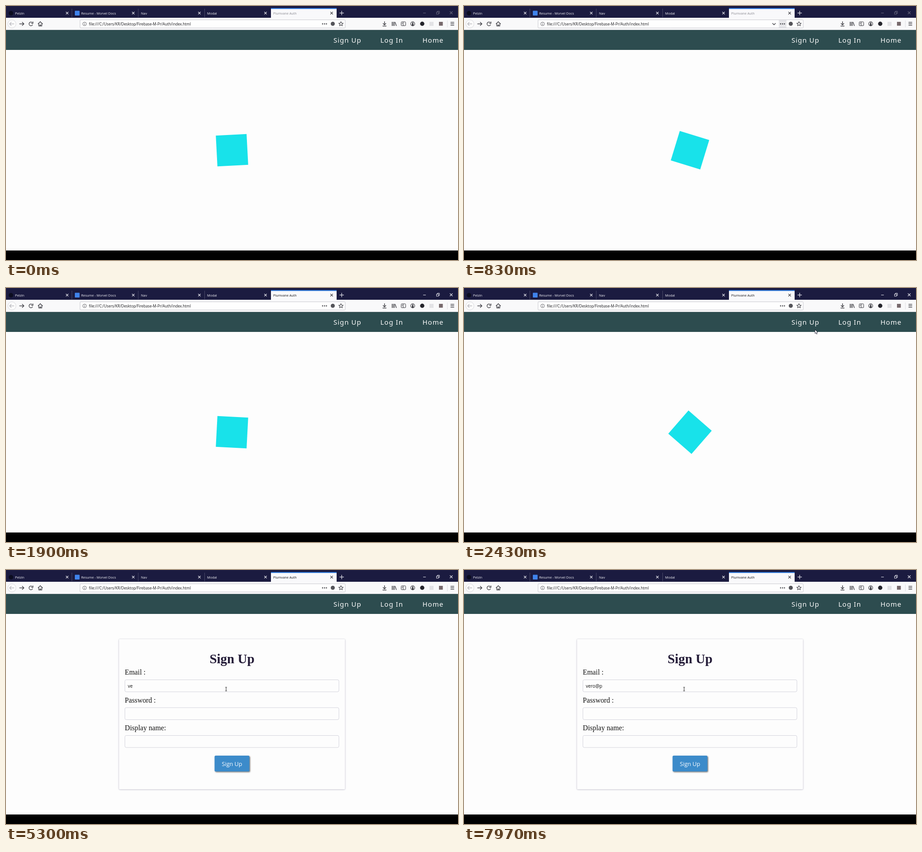
Write an HTML page with a canvas that moves like this. It is 998 px wide and 561 px high and loops after 8 s.

```html
<!DOCTYPE html>
<html lang="en">
<head>
<meta charset="utf-8">
<title>Auth demo</title>
<style>
  html, body { margin: 0; width: 100%; height: 100%; overflow: hidden; background: #fdfdfd; }
  canvas { display: block; width: 100%; height: 100%; }
</style>
</head>
<body>
<canvas id="stage" width="998" height="561"></canvas>
<script>
const ctx = document.getElementById('stage').getContext('2d');
const LOOP = 8000;
const STEP = 100 / 3;
const UI = '"Open Sans", "Noto Sans", sans-serif';
const SERIF = '"Liberation Serif", serif';
const PATH = 'file:///C:/Users/KR/Desktop/Firebase-M-Pr/Auth/index.html';
const INK = '#3a3a40';

const FOCUS_AT = 870;
const URL_HOVER = [740, 960];
const STATUS = [2530, 3230];
const MODAL_AT = 2830;
const EMAIL = 'vero@p';
const KEY_TIMES = [4870, 5200, 5700, 5930, 7370, 7830];

// Pointer path: time, x, y
const POINTER = [
  [2150, 792, 140], [2430, 775, 92], [2600, 765, 79],
  [2830, 765, 79], [3030, 661, 245], [3870, 486, 263]
];

const within = (t, [from, to]) => t >= from && t < to;

function rect(x, y, w, h, color) {
  ctx.fillStyle = color;
  ctx.fillRect(x, y, w, h);
}

function rounded(x, y, w, h, r, fill, stroke) {
  ctx.beginPath();
  ctx.roundRect(x, y, w, h, r);
  if (fill) { ctx.fillStyle = fill; ctx.fill(); }
  if (stroke) { ctx.strokeStyle = stroke; ctx.lineWidth = 1; ctx.stroke(); }
}

function disc(x, y, r, fill, stroke, width = 1) {
  ctx.beginPath();
  ctx.arc(x, y, r, 0, Math.PI * 2);
  if (fill) { ctx.fillStyle = fill; ctx.fill(); }
  if (stroke) { ctx.strokeStyle = stroke; ctx.lineWidth = width; ctx.stroke(); }
}

function line(points, color, width = 1.2) {
  ctx.beginPath();
  points.forEach(([x, y]) => ctx.lineTo(x, y));
  ctx.strokeStyle = color;
  ctx.lineWidth = width;
  ctx.stroke();
}

function text(str, x, y, font, color, align = 'left', spacing = 0) {
  ctx.font = font;
  ctx.fillStyle = color;
  ctx.textAlign = align;
  ctx.letterSpacing = spacing + 'px';
  ctx.fillText(str, x, y);
}

function cross(x, y, r, color) {
  line([[x - r, y - r], [x + r, y + r]], color, 1.1);
  line([[x - r, y + r], [x + r, y - r]], color, 1.1);
}

function drawTabs(active) {
  rect(0, 0, 998, 26, '#1b1b40');
  const tabs = [['Pelzin', 20], ['Resume - Morvel Docs', 166], ['Nav', 298], ['Modal', 444]];
  tabs.forEach(([label, x], i) => {
    text(label, x, 18.6, `7.4px ${UI}`, '#f2f2f6');
    cross(135 + i * 146, 15.7, 2.7, '#e8e8ee');
    if (i < 3) rect(145 + i * 146.5, 6, 1, 19, '#4b4b68');
  });
  disc(11, 16, 5, '#0c0d20');
  rounded(152, 10.5, 10.5, 10.5, 1, '#3f83ec');
  rect(585, 5, 145, 21, '#f9f9fb');
  rect(585, 4.5, 145, 2, '#2878e0');
  text('Plumvane Auth', 590, 18.6, `7.3px ${UI}`, active ? '#18181c' : '#8b8b92');
  cross(719, 15.7, 2.8, INK);
  line([[736.5, 15.5], [746, 15.5]], '#eeeef4', 1.2);
  line([[741.2, 10.8], [741.2, 20.2]], '#eeeef4', 1.2);

  const control = active ? '#e6e6ee' : '#65657d';
  line([[921, 15.5], [927, 15.5]], control, 1);
  ctx.strokeStyle = control;
  ctx.strokeRect(950.5, 13.5, 4.5, 4.5);
  line([[952.5, 13], [952.5, 11.5], [957, 11.5], [957, 16.5], [955, 16.5]], control, 1);
  cross(983, 15, 3, control);
}

function arrow(x, y, dir, color) {
  line([[x - 5 * dir, y], [x + 5 * dir, y]], color, 1.4);
  line([[x + dir, y - 4], [x + 5 * dir, y], [x + dir, y + 4]], color, 1.4);
}

function drawToolbar(hover) {
  rect(0, 26, 998, 27, '#f9f9fa');
  rect(0, 52, 998, 1, '#d8d8dc');
  disc(13, 39.5, 9, '#fcfcfc', '#d8d8dc');
  arrow(13, 39.5, -1, '#b9b9be');
  arrow(34.5, 39.5, 1, INK);

  // Reload and home
  ctx.beginPath();
  ctx.arc(55, 39.5, 4.1, 0.4, 5.4);
  ctx.strokeStyle = INK;
  ctx.lineWidth = 1.4;
  ctx.stroke();
  line([[59.5, 34.5], [59.5, 38.3], [55.8, 38.3]], INK, 1.4);
  line([[70.5, 39.8], [75.7, 34.8], [81, 39.8]], INK, 1.4);
  line([[72.5, 39], [72.5, 44], [79, 44], [79, 39]], INK, 1.4);
  rect(74.8, 41, 2, 3, INK);

  rounded(163.5, 30.5, 585.5, 18, 1.5, '#fefefe', '#c9c9d0');
  disc(173.5, 39.5, 4, null, '#606066');
  rect(173, 39, 1, 3, '#606066');
  rect(173, 37, 1, 1, '#606066');
  text(PATH, 183, 42.8, `8.25px ${UI}`, '#18181c');
  if (hover) {
    line([[681, 38], [684.5, 41.5], [688, 38]], INK, 1.3);
    rect(695, 31, 17, 17, '#e6e6e9');
  }
  [699, 703.3, 707.5].forEach(x => disc(x, 39.5, 1.3, INK));
  disc(721.5, 39.3, 4.5, '#55555a');

  ctx.beginPath();
  for (let i = 0; i < 10; i++) {
    const a = -Math.PI / 2 + i * Math.PI / 5, r = i % 2 ? 2.3 : 5;
    ctx.lineTo(739.6 + r * Math.cos(a), 39.6 + r * Math.sin(a));
  }
  ctx.closePath();
  ctx.strokeStyle = INK;
  ctx.lineWidth = 1.1;
  ctx.stroke();

  // Download, library, sidebar, account, add-ons, menu
  line([[835.7, 34], [835.7, 41.5]], INK, 1.4);
  line([[832.3, 38.3], [835.7, 41.7], [839.1, 38.3]], INK, 1.4);
  line([[831.5, 44.3], [840, 44.3]], INK, 1.4);
  [852.5, 855, 857.5].forEach(x => line([[x, 35], [x, 44]], INK, 1.3));
  line([[859, 35.5], [862, 44]], INK, 1.3);
  rounded(872.5, 35, 10, 8.5, 1.5, null, INK);
  line([[877, 35], [877, 43.5]], INK, 1);
  [37.5, 39.5].forEach(y => line([[874, y], [876, y]], INK, 0.8));
  disc(898, 39.3, 4.5, null, INK, 1.2);
  disc(898, 38, 1.7, INK);
  disc(898, 41.5, 2.2, INK);
  disc(919, 39.3, 4.7, '#25252c');
  rect(935, 35, 9, 9, '#e3e3e6');
  rect(956, 35, 8.5, 8.5, '#77696c');
  rect(974, 32, 1, 15, '#dedee2');
  [36, 39.3, 42.6].forEach(y => line([[981.5, y], [989.5, y]], INK, 1.3));
}

function drawNav() {
  rect(0, 53, 998, 44, '#2d4c4f');
  [['Sign Up', 723], ['Log In', 826.5], ['Home', 919.5]].forEach(([label, x]) =>
    text(label, x, 80.5, '500 15px "Noto Sans", "Open Sans", sans-serif', '#fafafa', 'left', 1));
}

function drawSpinner(t) {
  const time = Math.floor(t / STEP + 0.15) * STEP;
  ctx.save();
  ctx.translate(499, 318.5);
  ctx.rotate((-3 + time * 0.24) * Math.PI / 180);
  rect(-34, -34, 68, 68, '#18e2ea');
  ctx.restore();
}

function drawModal(t) {
  ctx.save();
  ctx.shadowColor = 'rgba(50, 45, 90, 0.4)';
  ctx.shadowBlur = 3;
  ctx.shadowOffsetY = 0.5;
  rounded(249.5, 152.5, 499, 332, 2, '#fdfdfd');
  ctx.restore();
  text('Sign Up', 499, 206, `bold 29px ${SERIF}`, '#241c38', 'center');

  [['Email :', 231], ['Password :', 292.5], ['Display name:', 354]].forEach(([label, y], i) => {
    text(label, 262.3, y, `15.7px ${SERIF}`, '#111');
    rounded(262.5, 242.5 + i * 61.5, 472.5, 26.5, 3, '#fdfdfd', '#d3d3dc');
  });
  const typed = KEY_TIMES.filter(k => t >= k).length;
  text(EMAIL.slice(0, typed), 269, 260.3, `10.2px ${UI}`, '#111');

  ctx.save();
  ctx.shadowColor = 'rgba(0, 0, 0, 0.55)';
  ctx.shadowBlur = 3;
  ctx.shadowOffsetX = ctx.shadowOffsetY = 1.5;
  rounded(460.5, 410, 77, 35, 2.5, '#3c8bca');
  ctx.restore();
  text('Sign Up', 499, 432.5, `12.6px ${UI}`, '#fafcff', 'center');
}

function drawStatus() {
  rect(0, 526, 215, 14, '#f2f2f4');
  line([[0, 526.5], [214.5, 526.5], [214.5, 540]], '#d0d0d4', 1);
  text(PATH + '#', 2.5, 536.5, `7.2px ${UI}`, '#3a3a3e');
}

function pointerAt(t) {
  const next = POINTER.findIndex(p => p[0] > t);
  if (next < 0) return POINTER[POINTER.length - 1].slice(1);
  const [t0, x0, y0] = POINTER[next - 1], [t1, x1, y1] = POINTER[next];
  const u = (t - t0) / (t1 - t0), e = u * u * (3 - 2 * u);
  return [x0 + (x1 - x0) * e, y0 + (y1 - y0) * e];
}

function drawPointer(t) {
  if (t < POINTER[0][0]) return;
  const [x, y] = pointerAt(t);
  if (t >= MODAL_AT && y > 241 && y < 270 && x < 736) {
    line([[x, y - 3.5], [x, y + 3.5]], '#222', 1);
    [-4, 4].forEach(d => line([[x - 1.8, y + d], [x + 1.8, y + d]], '#222', 1));
    return;
  }
  ctx.save();
  ctx.translate(x, y);
  ctx.beginPath();
  [[0, 0], [0, 8.5], [2, 6.7], [3.5, 9.8], [4.8, 9.2], [3.5, 6.3], [6, 6]]
    .forEach(([px, py]) => ctx.lineTo(px, py));
  ctx.closePath();
  ctx.fillStyle = '#fff';
  ctx.fill();
  ctx.strokeStyle = '#15152a';
  ctx.lineWidth = 0.8;
  ctx.stroke();
  ctx.restore();
}

function draw(t) {
  rect(0, 0, 998, 561, '#fdfdfd');
  drawTabs(t >= FOCUS_AT);
  drawToolbar(within(t, URL_HOVER));
  drawNav();
  if (t < MODAL_AT) drawSpinner(t);
  else drawModal(t);
  if (within(t, STATUS)) drawStatus();
  rect(0, 540, 998, 21, '#000');
  drawPointer(t);
}

const start = performance.now();
function frame() {
  draw((performance.now() - start) % LOOP);
  requestAnimationFrame(frame);
}
frame();
</script>
</body>
</html>
```
